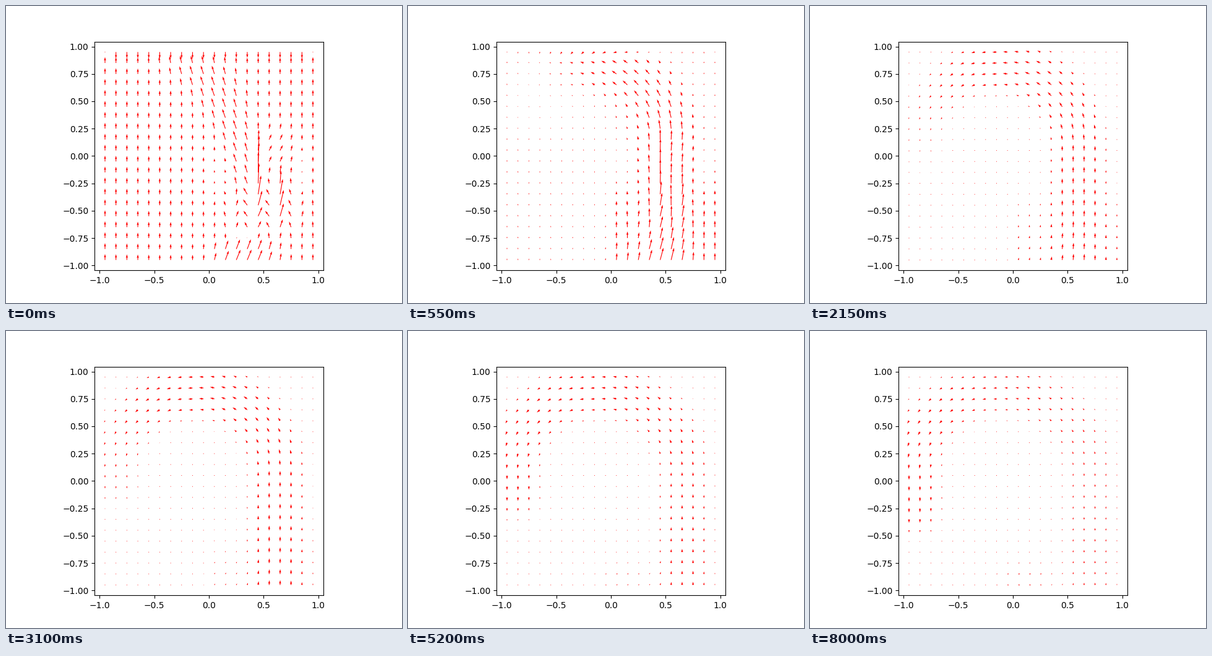
A matplotlib script that plays this animation: 640x480 px, repeating every 8050 ms.

```python
import numpy as np
import matplotlib.pyplot as plt
from matplotlib.animation import FuncAnimation

FRAMES, STEP = 161, 50

axis = np.linspace(-0.95, 0.95, 20)
X, Y = np.meshgrid(axis, axis)


def bell(d):
    return np.exp(-np.abs(d) ** 3)


def patch(x, y, rx, ry):
    return bell((X - x) / rx) * bell((Y - y) / ry)


def initial():
    """Updraught with a leaning plume, two thin jets and turbulence below."""
    u = np.zeros_like(X)
    v = 8.2 + 1.5 * X**2

    # Plume bending to the left as it rises
    centre = .28 - .15 * Y - .4 * Y**2
    width = .12 + .25 * np.clip(Y, 0, 1)
    lean = bell((X - centre) / width) * bell(np.clip((.1 - Y) / .5, 0, None))
    lean *= bell(np.clip((Y - .6) / .3, 0, None))
    u -= 5 * lean
    v += 6 * lean

    v += 24 * patch(.45, -.2, .04, .32) + 16 * patch(.65, -.4, .04, .22)
    v -= 4.5 * patch(.1, -.2, .14, .25) + 7 * patch(.87, -.15, .07, .25)
    u += 4.5 * patch(.6, .05, .16, .2)

    # Neighbouring columns lean opposite ways
    u += 6.5 * np.sin(10 * np.pi * X) * patch(.5, -.5, .33, .22)

    # Slanted inflow at the floor, with a slow layer above it
    inflow = patch(.33, -.92, .29, .13)
    u += 7 * inflow
    v += 8.5 * inflow - 9 * patch(.3, -.75, .12, .04)

    # The lid reverses the flow
    v[-1] *= -1.1
    u[-1] = 0
    v[-1, [0, -1]] = 0
    return u, v


def arch(s):
    """Current up the right side, across the top and down the left."""
    cx = -.12
    y0 = .05 + .15 * np.exp(-s)
    ax_r = .62 + .23 * (1 - np.exp(-s / 4))
    dx = (X - cx) / ax_r
    dy = np.clip(Y - y0, 0, None) / (.83 - y0)
    r = np.hypot(dx, dy)

    right = 19 / (1 + s / 2)
    top = 7.8 * np.exp(-(s / 12) ** 2) * (1 - np.exp(-s / .35))
    left = 7 * (1 - np.exp(-(s / 3.5) ** 2))
    speed = np.interp(np.arctan2(dy, dx), [0, np.pi / 2, np.pi],
                      [right, top, left])
    speed = speed * bell((r - 1) / .36)

    # The left branch reaches lower with time
    reach = bell(np.clip((.25 - .05 * s - Y) / .35, 0, None))
    speed *= np.where(X < cx, reach, 1)
    return -speed * dy / r, speed * dx / r


def velocity(s):
    """Velocity in pixels after s seconds."""
    u, v = arch(s)

    # Wide inflow at the lower right that dies away
    skirt = 14 * np.exp(-s / 1.7) * bell((Y + .95) / .65)
    skirt /= 1 + np.exp(-X / .02)
    u += skirt**2 / 25 * bell((X - .5) / .22)
    v = np.where(X > 0, np.hypot(v, skirt), v + skirt)

    # Slow return along the floor
    u += 3 * (1 - np.exp(-(s / 4) ** 2)) * patch(.1, -.88, .35, .2)

    grow = 1 - np.exp(-s / .25)
    fade = np.exp(-s / .4)
    return u * grow + U0 * fade, v * grow + V0 * fade


U0, V0 = initial()

fig, ax = plt.subplots(figsize=(6.4, 4.8), dpi=100)
ax.set_aspect("equal")
arrows = ax.quiver(X, Y, *velocity(0), color="r", scale=1, scale_units="dots")


def update(n):
    arrows.set_UVC(*velocity(n * STEP / 1000))
    return arrows,


anim = FuncAnimation(fig, update, frames=FRAMES, interval=STEP,
                     repeat=True, repeat_delay=0)
plt.show()
```
